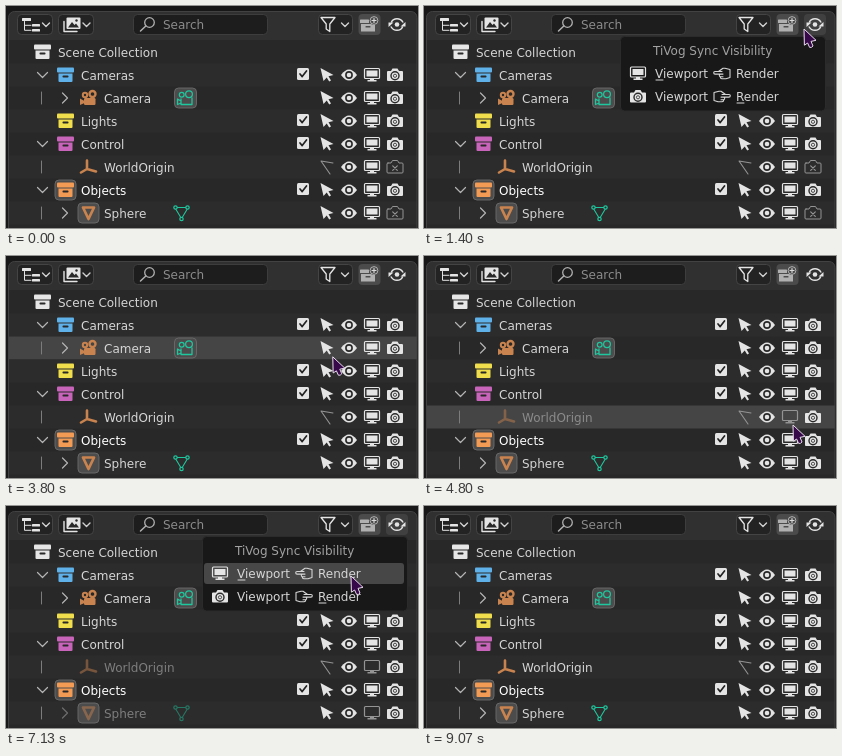
Write an HTML page that moves like this. It is 412 by 222 pixels and loops after 9800 ms.

```html
<!DOCTYPE html>
<html>
<head>
<meta charset="utf-8">
<style>
html, body { margin: 0; width: 100%; height: 100%; overflow: hidden; background: #181818; }
svg { display: block; width: 412px; height: 222px; }
text { font: 12px "DejaVu Sans", sans-serif; fill: #d6d6d6; }
</style>
</head>
<body>
<svg id="stage" viewBox="0 0 412 222" xmlns="http://www.w3.org/2000/svg"></svg>
<script>
const WHITE = '#e4e4e4', GREY = '#949494', DARK = '#292929';
const BROWN = '#c9834f', GREEN = '#1fc79e';
const LOOP = 9800, STEP = 1000 / 15;

const at = (x, y, s) => `<g transform="translate(${x} ${y})">${s}</g>`;
const path = (d, fill, more = '') => `<path d="${d}" fill="${fill}" ${more}/>`;
const line = (d, c, w = 1) => path(d, 'none', `stroke="${c}" stroke-width="${w}" stroke-linecap="round" stroke-linejoin="round"`);
const box = (x, y, w, h, r, fill, more = '') => `<rect x="${x}" y="${y}" width="${w}" height="${h}" rx="${r}" fill="${fill}" ${more}/>`;
const dot = (x, y, r, fill, more = '') => `<circle cx="${x}" cy="${y}" r="${r}" fill="${fill}" ${more}/>`;
const ring = (x, y, r, c, w) => dot(x, y, r, 'none', `stroke="${c}" stroke-width="${w}"`);
const text = (x, y, s, more = '') => `<text x="${x}" y="${y}" ${more}>${s}</text>`;
const show = (on, s) => on ? s : '';

const crate = c => box(-8.5, -7.5, 17, 5, 1, c) + path('M-7-1.5H7V6Q7 7 6 7H-6Q-7 7-7 6Z', c) + box(-3, .5, 6, 2, .8, DARK);
const down = line('M-5-2.5L0 2.5L5-2.5', '#b4b4b4', 1.2);
const right = line('M-2.5-5L2.5 0L-2.5 5', '#b4b4b4', 1.2);
const caret = line('M-3.5-1.5L0 2L3.5-1.5', '#d0d0d0', 1.4);
const check = box(-6, -6, 12, 12, 1.5, WHITE) + line('M-3 0L-.8 2.6L3.5-3', '#222', 1.7);
const eye = path('M-8 0Q-4-5.5 0-5.5Q4-5.5 8 0Q4 5.5 0 5.5Q-4 5.5-8 0Z', WHITE) +
  dot(0, 0, 3.1, WHITE, `stroke="${DARK}" stroke-width="1.6"`);
const pointer = on => on
  ? path('M-6.5-7L6.5 0L1.5 1.2L4 5.5L2.2 6.5L-.3 2.5L-3.5 6Z', WHITE)
  : line('M6-4L-6-6L3 7', GREY, 1.1);
const screen = on => {
  const c = on ? WHITE : GREY;
  return box(-7.5, -6.5, 15, 10, 1, 'none', `stroke="${c}" stroke-width="1.2"`) +
    show(on, box(-5.5, -4.5, 11, 6, 0, WHITE)) + path('M-2 3.5H2V5H4.5V6.5H-4.5V5H-2Z', c);
};
const shape = 'M-7-4H-4L-2.5-6.5H2.5L4-4H7Q8-4 8-3V5Q8 6 7 6H-7Q-8 6-8 5V-3Q-8-4-7-4Z';
const still = on => on
  ? path(shape, WHITE) + ring(0, .8, 4, DARK, 1.4) + ring(0, .8, 1.6, DARK, .8)
  : line(shape, GREY) + line('M-2.3-1.2L2.3 3.4M2.3-1.2L-2.3 3.4', GREY, 1.2);
const movie = ring(-3.5, -3, 2.2, BROWN, 2) + ring(4, -4, 3, BROWN, 2.4) +
  box(-4.5, 0, 11.5, 7, 1.2, BROWN) + path('M-4 3L-8.5 .5V7L-4 5Z', BROWN);
const movieLine = ring(-3.8, -3.2, 2.4, GREEN, 1.2) + ring(3.5, -3.8, 3.4, GREEN, 1.2) +
  line('M-4.5 1V6.5H6.5V0M-4.5 3L-8 1V6.5L-4.5 5', GREEN, 1.3);
const axes = line('M-1.5-6.5V2L-7.5 5.5M-1.5 2L7.5 4.5', BROWN, 2.6);
const cone = line('M-5.5-5.5H5.5L0 6Z', BROWN, 2.7);
const mesh = line('M-4-5.5H4M5.5-3.5L1 4M-5.5-3.5L-1 4', GREEN, 1.1) +
  [[-6, -5.5], [6, -5.5], [0, 6]].map(p => ring(...p, 1.7, GREEN, 1.2)).join('');
const plate = w => box(-w / 2, -10, w, 20, 4, '#4c4c4c', 'stroke="#6b6b6b" stroke-width=".9"');
const hand = line('M0-2H-7Q-8.3-2-8.3-.7T-7 .6H-1.5Q-3 .8-2.6 2.2T-1.5 3.2Q-2 5.2 0 5.2H4L8 4V-4L3-5.2H1L-3.2-2.2M-1.5 3.2H1M-1.5 .6H1', '#d6d6d6', 1.1);
const flip = s => `<g transform="scale(-1 1)">${s}</g>`;

const arrow = path('M0 0L12 11.3L7 12.4L9 17Q7.5 19 5.6 18.4L3.6 14L.4 16.2Z', '#37084a',
  'stroke="#e9dced" stroke-width="1" stroke-linejoin="round"');

function row(i, name, x, icon, state) {
  const y = 46 + 23 * i, fade = state.dim ? 'opacity=".48"' : '';
  let s = '';
  if (state.open) s += at(36.5, y, down);
  if (state.child) s += line(`M35.5 ${y - 6}V${y + 6}`, '#7c7c7c');
  if (state.plate) s += at(x, y, plate(21));
  s += `<g ${fade}>` + show(state.fold, at(59, y, right)) + at(x, y, icon) +
    text(x + 15.5, y + 5, name, state.active ? 'style="fill:#fff"' : '') + (state.data || '') + '</g>';
  if (!i) return s;
  return s + show(!state.child, at(297, y - 1, check)) + at(321, y, pointer(!state.locked)) +
    at(343, y, eye) + at(366, y, screen(!state.dim)) + at(389, y, still(!state.noRender));
}

function rows(n) {
  const noRender = n < 42;
  return [
    ['Scene Collection', 36.5, crate('#e6e6e6'), {}],
    ['Cameras', 59.5, crate('#5fb1ea'), { open: 1 }],
    ['Camera', 82.5, movie, { child: 1, fold: 1, data: at(179.5, 92, plate(22) + movieLine) }],
    ['Lights', 59.5, crate('#f0de4c'), {}],
    ['Control', 59.5, crate('#c864b9'), { open: 1 }],
    ['WorldOrigin', 82.5, axes, { child: 1, locked: 1, noRender, dim: n >= 68 && n < 117 }],
    ['Objects', 59.5, crate('#f39a55'), { open: 1, plate: 1, active: 1 }],
    ['Sphere', 82.5, cone, { child: 1, fold: 1, plate: 1, noRender, dim: n >= 83 && n < 117, data: at(175.5, 207, mesh) }]
  ].map((r, i) => row(i, ...r)).join('');
}

function header(lit) {
  const edge = 'stroke="#444" stroke-width="1"';
  const tree = box(-9, -6.5, 9, 3, .5, WHITE) + box(1, -.5, 8, 2.6, .5, WHITE) +
    box(1, 4.5, 8, 2.6, .5, WHITE) + line('M-6.5-3V5.8H0M-6.5 .8H0', WHITE);
  const images = line('M-8-3V7H5', WHITE, 1.4) + box(-5.5, -7, 14, 11.5, 1, WHITE) +
    path('M-4 3L0-2.5L2.5 .5L4-1L7 3Z', DARK) + dot(4.5, -4, 1.2, DARK);
  const funnel = line('M-7-7H7L1.8-.5V7L-1.8 4.5V-.5Z', WHITE, 1.3);
  const add = box(-9, -5, 9, 3.6, .6, '#b0b0b0') + path('M-8-.5H6V7H-8Z', '#b0b0b0') + box(-3.5, 1.5, 5, 1.6, .5, '#4b4b4b') +
    dot(5, -4, 4.6, '#4b4b4b') + ring(5, -4, 3.9, '#b0b0b0', 1) + line('M5-6V-2M3-4H7', '#d8d8d8', 1.2);
  const sync = line('M-5.5-2.5Q-4-5.8 0-5.8T5.8-2.5M5.5 2.5Q4 5.8 0 5.8T-5.8 2.5', WHITE, 1.5) +
    path('M8.5-2.5V2H3.5Z', WHITE) + path('M-8.5 2.5V-2H-3.5Z', WHITE) + dot(0, 0, 2.3, WHITE);
  return box(11.5, 8.5, 35, 20, 4, '#232323', edge) + at(25, 18.5, tree) + at(40, 18.5, caret) +
    box(52.5, 8.5, 35, 20, 4, '#232323', edge) + at(66, 18.5, images) + at(80.5, 18.5, caret) +
    box(127.5, 8.5, 134, 20, 4, '#1d1d1d', 'stroke="#3d3d3d"') +
    ring(143.5, 16.5, 4.8, '#b0b0b0', 1.3) + line('M139.8 20L134.5 25', '#b0b0b0', 1.5) +
    text(157, 23, 'Search', 'style="fill:#8c8c8c"') +
    box(312.5, 8.5, 34, 20, 4, '#232323', edge) + at(322, 18.5, funnel) + at(339, 18.5, caret) +
    box(352.5, 8, 22, 21, 4, '#4b4b4b') + at(363, 18.5, add) +
    show(lit, box(380, 8, 22, 21, 4, '#404040')) + at(391, 18.5, sync);
}

function popup(y) {
  const pick = y >= 57 && y < 80 ? 0 : y >= 80 && y < 103 ? 1 : -1;
  const item = (i, icon, sign, keyX, keyW) => {
    const c = 67.5 + 23 * i;
    return show(pick === i, box(198, c - 10.5, 200, 21, 3, '#474747')) + at(214, c, icon) +
      text(231, c + 4.5, 'Viewport') + at(298, c, sign) +
      text(312, c + 4.5, 'Render') + line(`M${keyX} ${c + 6.5}h${keyW}`, '#d6d6d6');
  };
  return box(196.5, 30.5, 205, 74.5, 4, '#181818', 'stroke="#2b2b2b"') +
    text(229, 49, 'TiVog Sync Visibility', 'style="fill:#a2a2a2"') +
    item(0, screen(true), hand, 232, 7) + item(1, still(true), flip(hand), 313, 7);
}

const ease = { l: p => p, i: p => p * p, o: p => 1 - (1 - p) ** 2, s: p => p * p * (3 - 2 * p) };
// step, x, y, easing into the point
const route = [
  [1, 396, 224, 'l'], [8, 390, 110, 'i'], [14, 386, 14, 'o'], [20, 386, 14, 'l'], [21, 380, 23, 'l'],
  [31, 299, 94, 'o'], [51, 299, 94, 'l'], [54, 312, 78, 's'], [63, 369, 166, 's'], [71, 369, 166, 'l'],
  [72, 369, 169, 'l'], [78, 369, 211, 'o'], [87, 369, 211, 'l'], [90, 386, 118, 'l'], [98, 389, 13, 'o'],
  [102, 389, 13, 'l'], [107, 345, 70, 's'], [129, 345, 70, 'l'], [136, 352, 226, 'i']
];
function cursor(n) {
  const k = route.findIndex(r => r[0] >= n);
  if (k < 1) return null;
  const a = route[k - 1], b = route[k], p = ease[b[3]]((n - a[0]) / (b[0] - a[0]));
  return { x: a[1] + (b[1] - a[1]) * p, y: a[2] + (b[2] - a[2]) * p };
}

const stage = document.getElementById('stage');
let last = -1;
function draw(t) {
  const n = Math.floor((t % LOOP + 5) / STEP) % 147;
  if (n === last) return;
  last = n;
  const c = cursor(n);
  const open = (n >= 15 && n < 42) || (n >= 99 && n < 117);
  const hover = c && !open && c.y >= 34.5 && c.y < 222 ? Math.floor((c.y - 34.5) / 23) : -1;
  let s = box(2.5, 5.5, 408.5, 230, 6, '#282828') + path('M3 34V11Q3 6 8 6H406Q411 6 411 11V34Z', '#303030');
  for (let i = 0; i < 9; i++) {
    if (i === hover) s += box(2, 34.5 + 23 * i, 409, 23, 0, '#454545');
    else if (i % 2) s += box(3, 34.5 + 23 * i, 408, 23, 0, '#2c2c2c');
  }
  s += box(2.5, 5.5, 408.5, 230, 6, 'none', 'stroke="#424242"');
  s += header(open || (c && c.y < 30 && c.x > 378)) + rows(n);
  if (open) s += popup(c.y);
  if (c) s += at(c.x, c.y, arrow);
  stage.innerHTML = s;
}

const start = performance.now();
function tick() {
  draw(performance.now() - start);
  requestAnimationFrame(tick);
}
tick();
</script>
</body>
</html>
```
